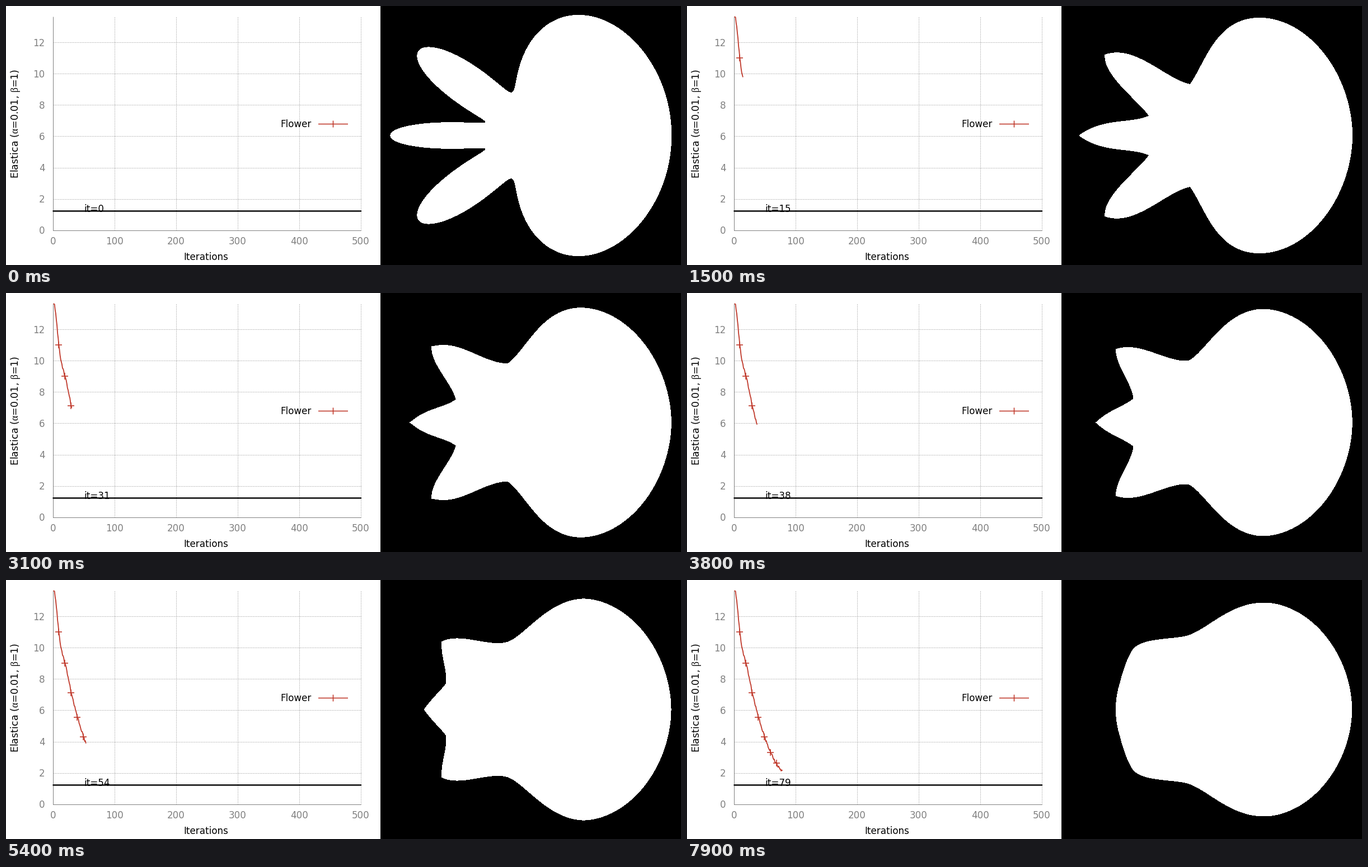
Write a matplotlib script that moves like this. It is 1206 px wide and 464 px high and loops after 8 s.

```python
import matplotlib.pyplot as plt
import numpy as np
from matplotlib.animation import FuncAnimation
from matplotlib.patches import Polygon, Rectangle

W, H, DPI = 1206, 464, 72
STEPS, INTERVAL = 80, 100
GRAY, RED = "#808080", "#c0392b"
LEFT, RIGHT, TOP, BOTTOM = 84.5, 634.5, 19.5, 402.5
MID_Y = 232

plt.rcParams.update({
    "font.family": "DejaVu Sans",
    "font.size": 16.8,
    "mathtext.fontset": "custom",
    "mathtext.rm": "Liberation Serif",
})


def px(iteration):
    return LEFT + 1.1 * np.asarray(iteration)


def py(value):
    return BOTTOM - 28.1 * np.asarray(value)


# --- outline ---------------------------------------------------------------
# Upper half from the top of the body to the left tip, as four cubic Beziers:
# body flank, outer petal side, inner petal side, middle petal.
POSES = {
    15: [(1025, 21.5), (945, 20), (926, 104), (899, 140.5),
         (855, 132), (800, 68), (747, 87.5),
         (744, 125), (808, 170), (826, 197),
         (790, 212), (745, 200), (701, 232)],
    46: [(1030, 31.5), (963, 35), (925, 108), (895, 116.5),
         (860, 123), (808, 90), (773, 106),
         (773, 135), (793, 160), (791.5, 188),
         (780, 200), (757, 213), (740, 232)],
    79: [(1031, 41), (965, 41), (925, 97), (885, 102),
         (850, 107.5), (810, 106), (796, 126),
         (787, 140), (779, 164), (774, 184),
         (769, 200), (766.5, 216), (766.5, 232)],
}
SAMPLES = (160, 70, 60, 60)


def even(points, n):
    """Polyline cut into n points at equal distances."""
    step = np.hypot(*np.diff(points, axis=0).T)
    s = np.concatenate([[0], np.cumsum(step)])
    u = np.linspace(0, s[-1], n)
    return np.column_stack([np.interp(u, s, points[:, k]) for k in (0, 1)])


def bezier(p):
    t = np.linspace(0, 1, 200)[:, None]
    return ((1 - t) ** 3 * p[0] + 3 * t * (1 - t) ** 2 * p[1]
            + 3 * t ** 2 * (1 - t) * p[2] + t ** 3 * p[3])


def flower():
    """Accelerated flower: rho = R + r cos(4 t^3 / pi^2)."""
    cuts = [0, np.pi * 0.25 ** (1 / 3), 2.513, np.pi * 0.75 ** (1 / 3), np.pi]
    parts = []
    for a, b, n in zip(cuts, cuts[1:], SAMPLES):
        t = np.linspace(a, b, 300)
        rho = 167.3 + 83.7 * np.cos(4 * t ** 3 / np.pi ** 2)
        xy = np.column_stack([937.7 + rho * np.cos(t),
                              MID_Y - rho * np.sin(t)])
        parts.append(even(xy, n))
    return np.concatenate(parts)


def outline(iteration, pose):
    p = np.array(pose)
    top_x, top_y = p[0]
    right = 1188.8 - iteration / 70
    a = np.linspace(0, 0.98, 100) * np.pi / 2
    power = 2 / 1.89
    quarter = np.column_stack([top_x + (right - top_x) * np.cos(a) ** power,
                               MID_Y - (MID_Y - top_y) * np.sin(a) ** power])
    parts = [bezier(p[i:i + 4]) for i in range(0, 12, 3)]
    parts[0] = np.vstack([quarter, parts[0]])
    return np.concatenate([even(c, n) for c, n in zip(parts, SAMPLES)])


def glide(times, shapes, u):
    """Smooth motion through the shapes given at times."""
    speed = np.gradient(shapes, times, axis=0)
    i = np.clip(np.searchsorted(times, u, side="right") - 1, 0, len(times) - 2)
    h = (times[i + 1] - times[i])[:, None, None]
    t = (u - times[i])[:, None, None] / h
    return (shapes[i] * (1 + 2 * t) * (1 - t) ** 2
            + shapes[i + 1] * t * t * (3 - 2 * t)
            + h * speed[i] * t * (1 - t) ** 2
            + h * speed[i + 1] * t * t * (t - 1))


steps = np.arange(STEPS)
key_times = np.array([0, *POSES], dtype=float)
key_shapes = np.array([flower()] + [outline(*k) for k in POSES.items()])
halves = glide(key_times, key_shapes, steps)

# --- energy curve: slowing fall, early ripple, slight jitter ----------------
energy_values = 1.97 + 0.00225 * (88 - steps) ** 1.9
energy_values += 1.3 * np.exp(-steps / 9) * np.sin(np.pi * (steps + 1.3) / 10)
energy_values += np.random.default_rng(4).uniform(-0.08, 0.08, STEPS)
energy_values = np.minimum(energy_values, 13.63)
curve_x, curve_y = px(steps), py(energy_values)

# --- static picture --------------------------------------------------------
fig = plt.figure(figsize=(W / DPI, H / DPI), dpi=DPI, facecolor="white")
ax = fig.add_axes([0, 0, 1, 1])
ax.set_xlim(0, W)
ax.set_ylim(H, 0)
ax.axis("off")


def line(xs, ys, color=GRAY, lw=1, **kw):
    return ax.plot(xs, ys, color=color, lw=lw, solid_capstyle="butt",
                   dash_capstyle="butt", snap=False, **kw)[0]


def label(x, y, text, color="black", ha="center", **kw):
    return ax.text(x, y, text, color=color, ha=ha, va="baseline", **kw)


dots = (0, (1, 2))
for it in range(0, 501, 100):
    x = px(it)
    label(x - 0.8, 427, str(it), GRAY)
    if it:
        line([x, x], [BOTTOM, TOP], ls=dots)
for value in range(0, 13, 2):
    y = np.floor(py(value)) + 0.5
    label(69.6, y + 6, str(value), GRAY, "right")
    if value:
        line([LEFT, RIGHT], [y, y], ls=dots)
line([LEFT, LEFT], [TOP, BOTTOM + 0.5])
line([LEFT, RIGHT], [BOTTOM, BOTTOM])

label(357.2, 455, "Iterations")
label(22, 211, r"Elastica ($\mathrm{\alpha}$=0.01, $\mathrm{\beta}$=1)",
      rotation=90, rotation_mode="anchor", fontsize=17.5)

label(546, 217, "Flower", ha="right")
line([558, 611], [211.5, 211.5], RED, 1.6)
line([584.5, 584.5], [205.5, 217.5], RED, 1.6)

counter = label(139.5, 368.6, "it=0", ha="left")
line([83.5, 635], [367.4, 367.4], "black", 2.4, zorder=4)

ax.add_patch(Rectangle((669, 0), W - 669, H, fc="black", lw=0,
                       antialiased=False))
shape = ax.add_patch(Polygon([(0, 0), (1, 0), (1, 1)], fc="white", lw=0,
                             antialiased=False, zorder=3))
energy = line([], [], RED, 1.8)
marks = line([], [], RED, 0, marker="+", ms=12, mew=1.6)


def update(step):
    half = halves[step]
    mirrored = half[::-1] * (1, -1) + (0, 2 * MID_Y)
    shape.set_xy(np.vstack([half, mirrored]))
    energy.set_data(curve_x[:step], curve_y[:step])
    marks.set_data(curve_x[9:step:10], curve_y[9:step:10])
    counter.set_text(f"it={step}")
    return shape, energy, marks, counter


anim = FuncAnimation(fig, update, frames=STEPS, interval=INTERVAL,
                     repeat=True, repeat_delay=0)
plt.show()
```
